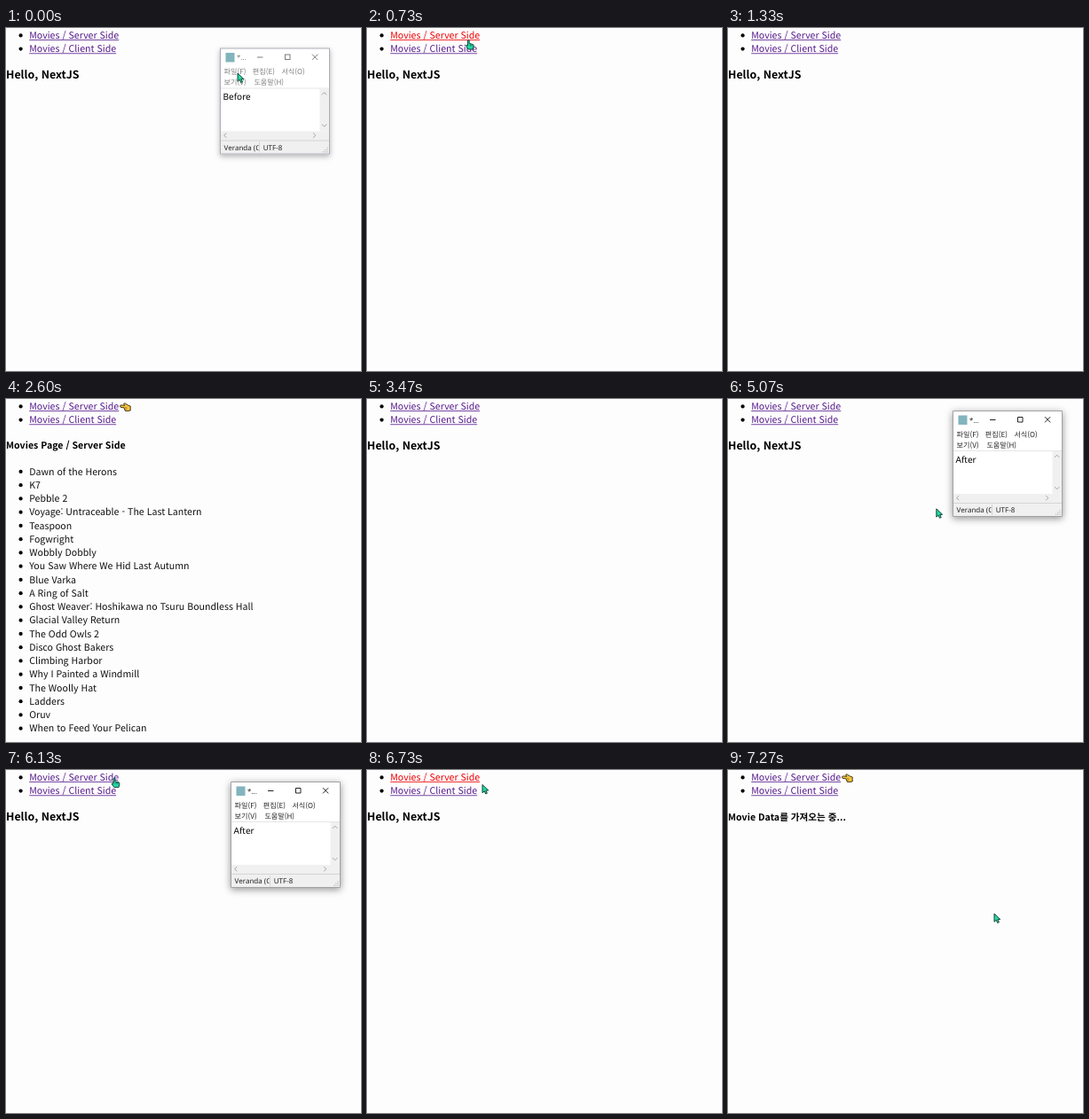
An HTML page with a canvas that plays this animation: 400x387 px, repeating every 8 s.

```html
<!DOCTYPE html>
<html lang="ko">
<head>
<meta charset="utf-8">
<title>Movies</title>
<style>
html, body { margin: 0; width: 100%; height: 100%; overflow: hidden; background: #fefdfe; }
canvas { display: block; width: 400px; height: 387px; }
</style>
</head>
<body>
<canvas id="stage"></canvas>
<script>
const W = 400, H = 387, LOOP = 8000;
const CJK = '"Noto Sans CJK KR", "Noto Sans KR", sans-serif';
const UI = '"Noto Sans", "Open Sans", sans-serif';
const PURPLE = '#551a8b', RED = '#ee0000';
const MOVIES = [
  'Dawn of the Herons', 'K7', 'Pebble 2', 'Voyage: Untraceable - The Last Lantern',
  'Teaspoon', 'Fogwright', 'Wobbly Dobbly', 'You Saw Where We Hid Last Autumn',
  'Blue Varka', 'A Ring of Salt', 'Ghost Weaver: Hoshikawa no Tsuru Boundless Hall',
  'Glacial Valley Return', 'The Odd Owls 2', 'Disco Ghost Bakers', 'Climbing Harbor',
  'Why I Painted a Windmill', 'The Woolly Hat', 'Ladders', 'Oruv', 'When to Feed Your Pelican'
];

// Each move holds [progress, x, y] points and advances in discrete steps.
const MOVES = [
  { start: 70, end: 530, steps: 8, path: [[0, 261, 51], [.2, 240, 45], [.75, 122, 16], [1, 101, 9]] },
  { start: 730, end: 1330, steps: 9, path: [[0, 101, 9], [.2, 125, 17], [.9, 375, 92], [1, 410, 104]] },
  { start: 4930, end: 5730, steps: 13, path: [[0, 296, 158], [.23, 235, 124], [.6, 158, 50], [1, 122, 9]] },
  { start: 6670, end: 7270, steps: 10, path: [[0, 122, 9], [.2, 138, 24], [.8, 280, 145], [1, 300, 162]] }
];

const canvas = document.getElementById('stage');
const ctx = canvas.getContext('2d');
const ratio = window.devicePixelRatio || 1;
canvas.width = W * ratio;
canvas.height = H * ratio;

function text(str, x, y, font, color = '#111') {
  ctx.font = font;
  ctx.fillStyle = color;
  ctx.fillText(str, x, y);
}

function rect(x, y, w, h, color) {
  ctx.fillStyle = color;
  ctx.fillRect(x, y, w, h);
}

function stroke(color, width, ...lines) {
  ctx.strokeStyle = color;
  ctx.lineWidth = width;
  ctx.beginPath();
  for (const [x, y, ...rest] of lines) {
    ctx.moveTo(x, y);
    for (let i = 0; i < rest.length; i += 2) ctx.lineTo(rest[i], rest[i + 1]);
  }
  ctx.stroke();
}

function outline(path, fill, line, width) {
  ctx.fillStyle = fill;
  ctx.strokeStyle = line;
  ctx.lineWidth = width;
  ctx.lineJoin = 'round';
  ctx.fill(path);
  ctx.stroke(path);
}

function bullet(y) {
  ctx.fillStyle = '#000';
  ctx.beginPath();
  ctx.arc(16.6, y, 2.1, 0, 7);
  ctx.fill();
}

function link(str, baseline, color) {
  bullet(baseline - 3.8);
  text(str, 26.2, baseline, `10.6px ${CJK}`, color);
  rect(26.2, baseline + 1, ctx.measureText(str).width, .8, color);
}

const PALM = new Path2D('M128.6 8.2 Q128.4 6.9 130 6.9 L133.8 7.4 L132.6 5.8 Q132.8 4.4 134.2 5 L137.5 7 L140.2 8 V13 L136.8 13.6 Q133.4 14 133.6 11.8 L133 9.8 L130 9.5 Q128.7 9.4 128.6 8.2 Z');

function pointingEmoji() {
  outline(PALM, '#f6c63c', '#332811', .9);
  stroke('#6d541d', .6, [133.6, 9.8, 136.6, 9.9], [133.8, 11.7, 136.4, 11.8]);
}

function drawPage(view, pressed) {
  link('Movies / Server Side', 12.2, pressed ? RED : PURPLE);
  link('Movies / Client Side', 27.4, PURPLE);
  const heading = `bold 10.6px ${CJK}`;
  if (view === 'home') {
    text('Hello, NextJS', 0, 56.6, `bold 12.4px ${CJK}`, '#000');
    return;
  }
  pointingEmoji();
  if (view === 'loading') {
    text('Movie Data를 가져오는 중...', 0, 56.8, heading, '#000');
    return;
  }
  text('Movies Page / Server Side', 0, 56.4, heading, '#000');
  MOVIES.forEach((title, i) => {
    const y = 85.7 + i * 15.25;
    bullet(y - 3.8);
    text(title, 26.2, y, `10.6px ${CJK}`);
  });
}

function chevron(x, y, dx, dy) {
  stroke('#a3a3a3', 1, [x - dx * 1.3 - dy * 2.6, y - dy * 1.3 - dx * 2.6, x + dx * 1.3, y + dy * 1.3,
    x - dx * 1.3 + dy * 2.6, y - dy * 1.3 + dx * 2.6]);
}

function drawNotepad(x, y, content, active, alpha = 1) {
  const ink = active ? '#222' : '#7d7d7d';
  ctx.save();
  ctx.globalAlpha = alpha;
  ctx.translate(x, y);
  ctx.save();
  ctx.shadowColor = active ? 'rgba(0,0,0,.42)' : 'rgba(0,0,0,.3)';
  ctx.shadowBlur = (active ? 8 : 6) * ratio;
  ctx.shadowOffsetY = 2 * ratio;
  rect(0, 0, 124, 120, '#fff');
  ctx.restore();

  rect(6.5, 5.5, 10, 10.5, '#82b4bd');
  text('*...', 19, 13.5, `8px ${UI}`, ink);
  stroke(ink, 1, [42, 10.5, 48.5, 10.5], [104, 7.2, 110.2, 13.4], [110.2, 7.2, 104, 13.4]);
  ctx.strokeRect(73.5, 7.5, 5.5, 5.5);

  const menu = `8.1px ${CJK}`;
  [['파일(F)', 4.6, 29.5], ['편집(E)', 36.8, 29.5], ['서식(O)', 69.4, 29.5],
   ['보기(V)', 4.6, 41.9], ['도움말(H)', 38.4, 41.9]]
    .forEach(([label, mx, my]) => text(label, mx, my, menu, ink));

  rect(0, 45, 124, 1, '#e6e6e6');
  text(content, 3.5, 58.5, `10px ${UI}`, '#000');
  rect(112.5, 46, 10.5, 48, '#f0f0f0');
  rect(1, 94, 122, 10.5, '#f0f0f0');
  chevron(117.7, 51.5, 0, -1);
  chevron(117.7, 87.5, 0, 1);
  chevron(6, 98.7, -1, 0);
  chevron(106.5, 98.7, 1, 0);

  rect(1, 104.5, 122, 14.5, '#f0f0f0');
  rect(1, 104, 122, 1, '#d5d5d5');
  ctx.save();
  ctx.beginPath();
  ctx.rect(0, 104, 43.5, 16);
  ctx.clip();
  text('Veranda (CRLF)', 4.6, 115, `8px ${UI}`, '#222');
  ctx.restore();
  rect(44, 106, 1, 12, '#d5d5d5');
  text('UTF-8', 48.7, 115, `8px ${UI}`, '#222');
  for (let i = 0; i < 3; i++)
    for (let j = 0; j <= i; j++) rect(120.5 - j * 2.2, 112.3 + i * 2.2, 1.1, 1.1, '#b2b2b2');

  ctx.strokeStyle = active ? '#a2a2a2' : '#a9adb5';
  ctx.lineWidth = 1;
  ctx.strokeRect(.5, .5, 123, 119);
  ctx.restore();
}

const ARROW = new Path2D('M0 0 V9.3 L2.2 7.3 L3.7 10.5 L5.4 9.7 L3.9 6.7 L6.8 6.5 Z');
const HAND = new Path2D('M-.9 .6 Q0 -.7 .9 .6 V4 L5 5 Q6.1 5.3 5.9 7 L5 10.6 H-.2 L-2.7 7 Q-3 5.8 -1.9 5.9 L-.9 6.7 Z');

function drawCursor([x, y]) {
  const overLink = x > 26 && x < 127 && y < 28;
  ctx.save();
  ctx.translate(x, y);
  outline(overLink ? HAND : ARROW, '#20d9a2', '#17443c', 1);
  if (overLink) stroke('#17443c', .6, [2.1, 4.8, 2.1, 7], [3.8, 5.2, 3.8, 7.2]);
  ctx.restore();
}

function along(path, u) {
  const i = Math.max(1, path.findIndex(p => p[0] >= u));
  const [u0, x0, y0] = path[i - 1], [u1, x1, y1] = path[i];
  const k = (u - u0) / (u1 - u0);
  return [x0 + (x1 - x0) * k, y0 + (y1 - y0) * k];
}

function cursorAt(t) {
  if (t < MOVES[0].start) return along(MOVES[0].path, 0);
  const { start, end, steps, path } = MOVES.filter(m => m.start <= t).pop();
  const done = Math.min(steps, 1 + Math.floor((t - start) * (steps - 1) / (end - start)));
  return along(path, done / steps);
}

function viewAt(t) {
  if (t >= 6735) return 'loading';
  return t >= 2600 && t < 3470 ? 'list' : 'home';
}

function draw(t) {
  ctx.setTransform(ratio, 0, 0, ratio, 0, 0);
  ctx.textRendering = 'geometricPrecision';
  rect(0, 0, W, H, '#fefdfe');
  const pressed = (t >= 730 && t < 800) || (t >= 6670 && t < 6735);
  drawPage(viewAt(t), pressed);
  if (t < 730) drawNotepad(241, 22.5, 'Before', false);
  if (t >= 4530 && t < 6670) {
    const step = Math.min(4, 1 + Math.floor((t - 4530) / 66));
    drawNotepad(253, 13, 'After', true, step / 4);
  }
  if (t < 1330 || t >= 4930) drawCursor(cursorAt(t));
}

const begin = performance.now();
function tick() {
  draw((performance.now() - begin) % LOOP);
  requestAnimationFrame(tick);
}
tick();
</script>
</body>
</html>
```
